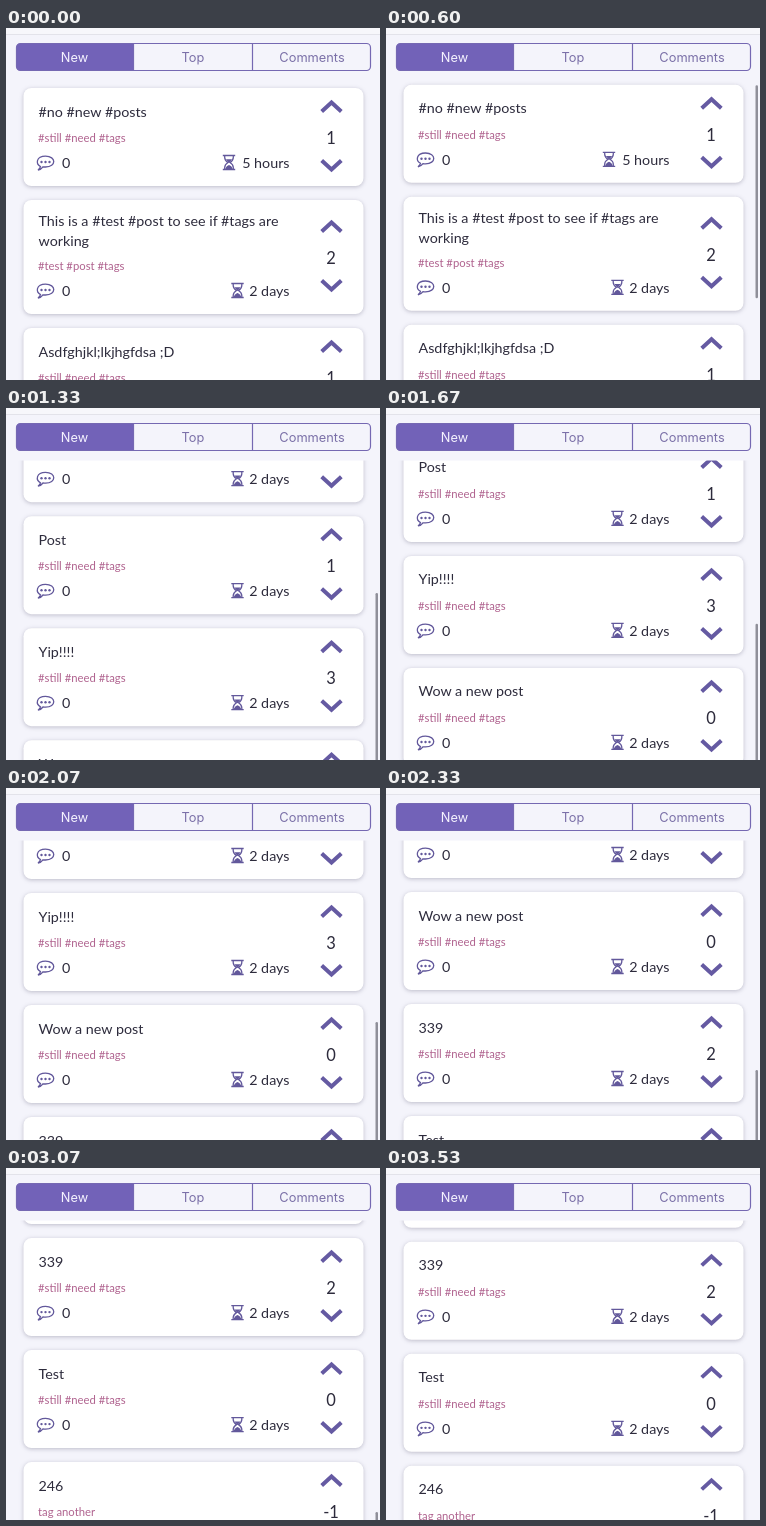
Write an HTML page that moves like this. It is 374 px wide and 352 px high and loops after 3.59 s.

```html
<!DOCTYPE html>
<html lang="en">
<head>
<meta charset="utf-8">
<title>Post feed</title>
<style>
  html, body { margin: 0; width: 100%; height: 100%; overflow: hidden; background: #f4f4fb; }
  svg { display: block; width: 374px; height: 352px; }
  text { font: 14.3px Lato, sans-serif; fill: #2d2b3c; }
  .tab { font: 12.8px Inter, sans-serif; fill: #7b70a8; text-anchor: middle; }
  .on { fill: #f6f4ff; }
  .tags { font-size: 11.3px; fill: #b0638f; }
  .votes { font-size: 16.5px; text-anchor: middle; }
  .age { text-anchor: end; }
  .card { fill: #fff; filter: drop-shadow(0 1.5px 2px rgba(40, 36, 70, .27)); }
  .line { fill: none; stroke: #62589b; stroke-width: 1.3; }
  .arrow { fill: none; stroke: #655aa2; stroke-width: 4; }
  .solid { fill: #62589b; }
</style>
</head>
<body>
<svg viewBox="0 0 374 352">
  <defs>
    <clipPath id="view"><rect y="52.5" width="374" height="300"/></clipPath>
    <g id="bubble">
      <path class="line" d="M-5 4.6C-10 2-9.5-5.8 0-5.8C11-5.8 11 5 0 5Q-1.5 5-2.5 4.8Q-4.5 7.5-7.5 8Q-5.5 6.5-5 4.6Z"/>
      <g class="solid"><circle cx="-4" r="1.2"/><circle r="1.2"/><circle cx="4" r="1.2"/></g>
    </g>
    <g id="glass">
      <path class="line" d="M-6.2-7H6.2M-6.2 7H6.2M-4.3-7V-5Q-4.3-2-1 0Q-4.3 2-4.3 5V7M4.3-7V-5Q4.3-2 1 0Q4.3 2 4.3 5V7"/>
      <path class="solid" d="M-3.2-3.2H3.2L0 .5ZM-3.8 7Q-3.3 3.5 0 2.5Q3.3 3.5 3.8 7Z"/>
    </g>
  </defs>
  <rect width="374" height="352" fill="#f4f4fb"/>
  <rect width="374" height="6" fill="#f7f7fb"/>
  <path d="M0 6.5H374" stroke="#e3e3ea"/>
  <g clip-path="url(#view)"><g id="list"></g></g>
  <path d="M128 15.5H14.5Q10.5 15.5 10.5 19.5V38.5Q10.5 42.5 14.5 42.5H128Z" fill="#7262b8"/>
  <rect x="10.5" y="15.5" width="354" height="27" rx="4" fill="none" stroke="#7568b2" stroke-width="1.2"/>
  <path d="M127.5 15.5V42.5M246.5 15.5V42.5" stroke="#7568b2" stroke-width="1.2"/>
  <text class="tab on" x="68.5" y="33.5">New</text>
  <text class="tab" x="187" y="33.5">Top</text>
  <text class="tab" x="306" y="33.5">Comments</text>
  <rect id="thumb" x="369.5" width="2.5" height="213" rx="1.25" fill="#8f8f99" opacity="0"/>
</svg>
<script>
const STEP = 200 / 3, LOOP = 3590, TAGS = '#still #need #tags';
const list = document.getElementById('list');
const thumb = document.getElementById('thumb');

const posts = [
  { title: ['#no #new #posts'], votes: 1, age: '5 hours' },
  { title: ['This is a #test #post to see if #tags are', 'working'], tags: '#test #post #tags', votes: 2 },
  { title: ['Asdfghjkl;lkjhgfdsa ;D'], votes: 1 },
  { title: ['Post'], votes: 1 },
  { title: ['Yip!!!!'], votes: 3 },
  { title: ['Wow a new post'], votes: 0 },
  { title: ['339'], votes: 2 },
  { title: ['Test'], votes: 0 },
  { title: ['246'], tags: 'tag another', votes: -1 }
];

const label = (x, y, value, kind = '') => `<text class="${kind}" x="${x}" y="${y}">${value}</text>`;
const arrow = (y, dir) => `<path class="arrow" d="M315.7 ${y + 5 * dir}L325.5 ${y - 4 * dir}L335.3 ${y + 5 * dir}"/>`;

function card({ title, tags = TAGS, votes, age = '2 days' }, y) {
  const extra = (title.length - 1) * 16;
  const height = 98 + extra, mid = height / 2;
  const first = extra ? 26 : 28.5;
  return `<g transform="translate(0 ${y})">
    <rect class="card" x="17.5" width="340" height="${height}" rx="8"/>
    ${title.map((line, i) => label(32.5, first + i * 20, line)).join('')}
    ${label(32, 54 + extra, tags, 'tags')}
    <use href="#bubble" x="39.5" y="${74 + extra}"/>
    ${label(56, 80 + extra, 0)}
    <use href="#glass" x="${age === '2 days' ? 231.5 : 223}" y="${74.5 + extra}"/>
    ${label(283.5, 80 + extra, age, 'age')}
    ${arrow(mid - 30.5, 1)}${label(325, mid + 7, votes, 'votes')}${arrow(mid + 28.5, -1)}
  </g>`;
}

let cardY = 60;
list.innerHTML = posts.map(post => {
  const html = card(post, cardY);
  cardY += 112 + (post.title.length - 1) * 16;
  return html;
}).join('');

// Two flicks: each a drag followed by a coast, then a bounce at the end of the list.
function scrollAt(t) {
  const glide = from => Math.exp((from - t) / 540);
  if (t < 500) return 0;
  if (t < 870) return 96 * ((t - 500) / 370) ** 2.6;
  if (t < 2070) return 458.4 - 362.4 * glide(870);
  if (t < 2330) return 419 + 113 * ((t - 2070) / 260) ** 1.2;
  if (t < 2730) return 532 + 273 * (1 - glide(2330));
  const dt = t - 2730;
  return 674 + (1 + 0.25 * dt) * Math.exp(-dt / 110);
}

function thumbAlpha(t) {
  if (t < 520) return 0;
  return Math.max(0, Math.min(1, (3480 - t) / 220));
}

function draw(now) {
  const t = Math.floor((now % LOOP + 4) / STEP) * STEP;
  const y = scrollAt(Math.round(t / 10) * 10);
  list.setAttribute('transform', `translate(0 ${(-y).toFixed(2)})`);
  thumb.setAttribute('y', (56 + 0.425 * y).toFixed(2));
  thumb.setAttribute('opacity', thumbAlpha(t).toFixed(2));
}

const start = performance.now();
function tick() {
  draw(performance.now() - start);
  requestAnimationFrame(tick);
}
tick();
</script>
</body>
</html>
```
